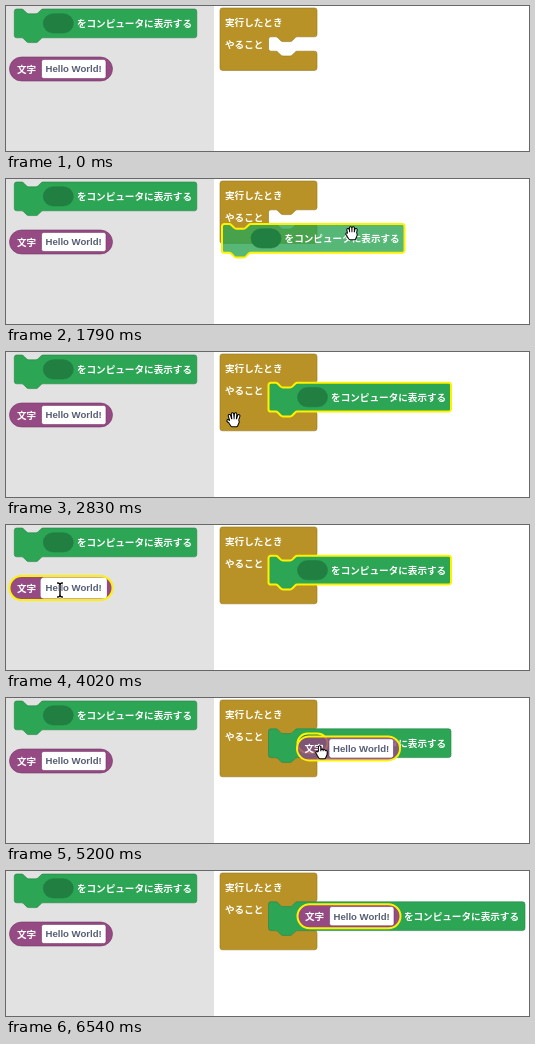
These frames come from a looping animation (523 px wide and 145 px high, 7130 ms). An HTML page:

```html
<!DOCTYPE html>
<html lang="ja">
<head>
<meta charset="utf-8">
<style>
html, body { margin: 0; width: 100%; height: 100%; overflow: hidden; background: #fff; }
svg { display: block; width: 523px; height: 145px; }
text { font: bold 9.6px "Noto Sans CJK JP", "Noto Sans CJK", sans-serif; fill: #fff; }
.value { font-family: "Liberation Sans", sans-serif; fill: #575e75; }
.body, .socket, .field { stroke-width: .6; }
.green { fill: #2ca554; stroke: #238443; }
.olive { fill: #b89226; stroke: #96761c; }
.purple { fill: #964a84; stroke: #743766; }
.socket { fill: #217f42; stroke: #217f42; }
.field { fill: #fff; stroke: #743766; }
.dragging > .body { fill-opacity: .8; }
.selected > .body, .near > .socket { stroke: #fff200; stroke-width: 2; }
.hover > .field { stroke: #fff; stroke-width: 1.8; }
.marker { opacity: .2; }
.cursor path { stroke-linecap: round; stroke-linejoin: round; }
</style>
</head>
<body>
<svg viewBox="0 0 523 145">
  <rect width="208" height="145" fill="#e2e2e2"/>
  <g id="stage"></g>
</svg>
<script>
const LOOP = 7130, STEPS = 48;
const WIDTH = 182.5, WIDE = 256.5;
const stage = document.getElementById('stage');

function add(parent, tag, attrs = {}, content = '') {
  const node = document.createElementNS('http://www.w3.org/2000/svg', tag);
  for (const key in attrs) node.setAttribute(key, attrs[key]);
  node.textContent = content;
  return parent.appendChild(node);
}

const show = (node, on) => { node.style.display = on ? '' : 'none'; };
const move = (node, x, y) => node.setAttribute('transform', `translate(${x} ${y})`);

// Connector notch, drawn rightwards (s = 1) or leftwards (s = -1).
const notch = s =>
  `c${1.2 * s} 0 ${1.8 * s} .6 ${2.4 * s} 1.2l${2.4 * s} 2.4c${.6 * s} .6 ${1.2 * s} 1.2 ${2.4 * s} 1.2` +
  `h${7.2 * s}c${1.2 * s} 0 ${1.8 * s} -.6 ${2.4 * s} -1.2l${2.4 * s} -2.4c${.6 * s} -.6 ${1.2 * s} -1.2 ${2.4 * s} -1.2`;
const corner = (x, y, sweep = 1) => `a2.4 2.4 0 0 ${sweep} ${x * 2.4} ${y * 2.4}`;

const statementPath = w =>
  `M2.4 0H7.2${notch(1)}H${w - 2.4}${corner(1, 1)}V26.4${corner(-1, 1)}` +
  `H28.8${notch(-1)}H2.4${corner(-1, -1)}V2.4${corner(1, -1)}Z`;

const eventPath = slot =>
  `M2.4 0H94.6${corner(1, 1)}V26.4${corner(-1, 1)}H77.3${notch(-1)}h-4.8${corner(-1, 1, 0)}` +
  `v${slot - 4.8}${corner(1, 1, 0)}h4.8${notch(1)}H94.6${corner(1, 1)}v14.4${corner(-1, 1)}` +
  `H2.4${corner(-1, -1)}V2.4${corner(1, -1)}Z`;

function printBlock() {
  const g = add(stage, 'g');
  const body = add(g, 'path', { class: 'body green', d: statementPath(WIDTH) });
  const socket = add(g, 'rect', { class: 'socket', x: 29, y: 4.8, width: 30, height: 19.2, rx: 10 });
  const label = add(g, 'text', { x: 62.6, y: 18 }, 'をコンピュータに表示する');
  return { g, body, socket, label };
}

function textBlock() {
  const g = add(stage, 'g');
  add(g, 'rect', { class: 'body purple', width: 103, height: 24, rx: 12 });
  add(g, 'text', { x: 7.4, y: 15.6 }, '文字');
  add(g, 'rect', { class: 'field', x: 32, y: 2.4, width: 64.5, height: 19.2, rx: 2.4 });
  add(g, 'text', { class: 'value', x: 36, y: 15.4 }, 'Hello World!');
  return g;
}

const event = add(stage, 'g');
move(event, 214, 2);
const eventBody = add(event, 'path', { class: 'body olive' });
add(event, 'text', { x: 5, y: 18 }, '実行したとき');
add(event, 'text', { x: 5, y: 39.6 }, 'やること');

move(printBlock().g, 8.3, 3);
move(textBlock(), 3.5, 51);
const marker = add(stage, 'path', { class: 'marker', d: statementPath(WIDTH) });
move(marker, 262.5, 30.8);
const print = printBlock(), word = textBlock();

const palm = 'M-3 0H3.5L4 2L2.5 5.5H-2L-4 2.5Z';
const shapes = {
  open: 'M-3.2 0L-4.6-4.3M-1-1L-1.5-6M1.2-1L1.6-6M3.5 0L4.8-4.2M-3 3L-6 .8' + palm,
  fist: 'M-3.3 0L-4-3.4M-1.2-1L-1.4-5M1.1-1L1.2-5M3.4 0L4-3.4M-3 3L-5 1' + palm,
  point: 'M-2.4 1V-5M0 0V-1.6M2.2 0V-1.2M4 1V-.4M-3 3L-5 .8' + palm,
  beam: 'M-2.4-7Q0-7 0-5Q0-7 2.4-7M0-5V5M-2.4 7Q0 7 0 5Q0 7 2.4 7'
};

function makeCursor(kind) {
  const g = add(stage, 'g', { class: 'cursor' });
  const layer = (fill, stroke, width) =>
    add(g, 'path', { d: shapes[kind], fill, stroke, 'stroke-width': width });
  if (kind === 'beam') {
    layer('none', '#fff', 2.8);
    layer('none', '#000', 1.4);
  } else {
    layer('#000', '#000', 3.4);
    layer('#fff', '#fff', 1.4);
  }
  return g;
}
const cursors = Object.fromEntries(Object.keys(shapes).map(kind => [kind, makeCursor(kind)]));

// Key points: step, x, y and, for the pointer, the shape it takes on.
const pointerKeys = [
  [1, 150, 138, 'open'], [8, 131, 13, 'fist'], [12, 346, 54, 'fist'], [16, 386, 43, 'open'],
  [17, 386, 43, 'open'], [19, 228, 68, 'open'], [21, 110, 84, 'open'], [25, 54, 65, 'beam'],
  [28, 54, 65, 'beam'], [30, 28, 66, 'point'], [35, 316, 54, 'point'], [38, 315, 44, 'open'],
  [40, 315, 44, 'open'], [43, 488, 136, 'open']
];
const printKeys = [[8, 8.3, 3], [12, 216, 45], [15, 262.5, 34], [16, 262.5, 30.8]];
const wordKeys = [[25, 3.5, 51], [30, 3.5, 51], [35, 291, 38.4], [38, 291.5, 33.2]];

// Eased position between the key points around a step.
function follow(keys, step) {
  const i = Math.max(0, keys.findLastIndex(k => k[0] <= step));
  const [s0, x0, y0, kind] = keys[i];
  const [s1, x1, y1] = keys[i + 1] || keys[i];
  const t = s1 > s0 ? (step - s0) / (s1 - s0) : 0;
  const e = t * t * (3 - 2 * t);
  return { x: x0 + (x1 - x0) * e, y: y0 + (y1 - y0) * e, kind };
}

function place(node, keys, step, visible) {
  const { x, y, kind } = follow(keys, step);
  show(node, visible);
  move(node, x, y);
  return kind;
}

function draw(step) {
  const within = (from, to) => step >= from && step < to;
  const joined = step >= 38;

  eventBody.setAttribute('d', eventPath(step >= 13 ? 28.8 : 14.4));
  show(marker, within(13, 16));

  place(print.g, printKeys, step, step >= 8);
  print.g.classList.toggle('dragging', within(9, 16));
  print.g.classList.toggle('selected', step < 30);
  print.g.classList.toggle('near', within(35, 38));
  print.body.setAttribute('d', statementPath(joined ? WIDE : WIDTH));
  print.label.setAttribute('x', joined ? 135.4 : 62.6);
  show(print.socket, !joined);

  place(word, wordKeys, step, step >= 25);
  word.classList.add('selected');
  word.classList.toggle('dragging', within(30, 38));

  for (const kind in cursors)
    show(cursors[kind], place(cursors[kind], pointerKeys, step, true) === kind && within(1, 44));
  word.classList.toggle('hover', within(25, 30));
}

const start = performance.now();
function tick() {
  const time = (performance.now() - start) % LOOP;
  draw(Math.floor(time / LOOP * STEPS));
  requestAnimationFrame(tick);
}
tick();
</script>
</body>
</html>
```
